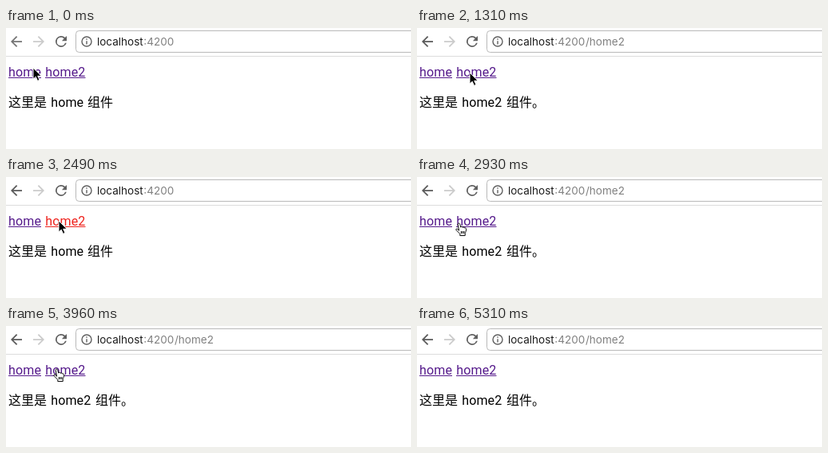
An HTML page that plays this animation: 507x152 px, repeating every 5890 ms.

```html
<!DOCTYPE html>
<html lang="zh">
<head>
<meta charset="utf-8">
<style>
html, body { margin: 0; width: 100%; height: 100%; overflow: hidden; background: #fff; }
svg { display: block; width: 507px; height: 152px; }
text { font: 16px Roboto, "Noto Sans CJK SC", "Noto Sans CJK", sans-serif; letter-spacing: .15px; }
.url text { font: 13.5px Inter, sans-serif; letter-spacing: 0; fill: #808080; }
.url .host { fill: #1c1c1c; }
.zh { letter-spacing: 0; }
</style>
</head>
<body>
<svg viewBox="0 0 507 152">
  <defs>
    <path id="arrow" d="M20 11H7.83l5.59-5.59L12 4l-8 8 8 8 1.41-1.41L7.83 13H20z"/>
  </defs>
  <path d="M0 35.5H507" stroke="#dcdcdc"/>
  <use id="back" href="#arrow" transform="translate(2.5 6.5) scale(.875)"/>
  <use href="#arrow" fill="#cbcbcb" transform="translate(51.5 6.5) scale(-.875 .875)"/>
  <path fill="#5f5f5f" transform="translate(58.5 6.5) scale(.875)"
    d="M17.65 6.35A8 8 0 1 0 19.73 14h-2.08A6 6 0 1 1 12 6c1.66 0 3.14.69 4.22 1.78L13 11h7V4z"/>
  <rect x="87.5" y="3.5" width="440" height="27" rx="4" fill="#fff" stroke="#b9b9b9"/>
  <g fill="none" stroke="#5f5f5f" stroke-width="1.4">
    <circle cx="101" cy="17" r="6"/>
    <path d="M101 13.3v1.5M101 16.2v4.3"/>
  </g>
  <g class="url">
    <text class="host" x="114" y="22">localhost</text>
    <text x="172.3" y="22">:4200</text>
    <text id="path" x="211" y="22">/home2</text>
  </g>
  <g id="link1"><text x="3" y="61">home</text><path d="M3 62.5H44" stroke="currentColor"/></g>
  <g id="link2"><text x="49.3" y="61">home2</text><path d="M49 62.5H99.5" stroke="currentColor"/></g>
  <text class="zh" x="3" y="99">这里是</text>
  <text id="name" x="56.2" y="99"></text>
  <text id="part" class="zh" y="99"></text>
  <path id="cursor" stroke-linejoin="round"/>
</svg>
<script>
const LOOP = 5890;
const ARROW = "M0 0V14.2L3.2 11.2 5.6 16.4 8 15.3 5.7 10.3H10.2Z";
const HAND = "M4.6 10.2L3.2 3C2.9.8 5.3.4 5.8 2.4L6.6 6C7.5 5 8.8 5.3 9.1 6.3 10 5.6 11.3 6 11.5 7 12.7 6.6 13.6 7.3 13.6 8.6 13.6 11 12.8 12.3 12.2 13.6V16.6H5.8V14.4C4.4 13 2.6 11.2 1 9.6.3 8.4 1.8 7.6 2.8 8.5Z" +
  "M7.4 11v3M9.2 11v3M11 11v3";
// start ms, cursor x, y, cursor shape, open page, pressed link
const steps = [
  [0, 34, 50, "a", 1], [140, 34, 51, "a", 1], [290, 35, 53, "a", 1],
  [440, 36, 55, "a", 1], [580, 38, 58, "a", 1], [730, 39, 60, "a", 1],
  [880, 46, 60, "a", 1], [1020, 58, 58, "a", 1], [1170, 67, 56, "a", 1],
  [1310, 66, 56, "a", 2], [1460, 60, 56, "h", 2],
  [1760, 35, 58, "h", 2], [1900, 34, 58, "h", 2], [2050, 34, 58, "h", 1],
  [2200, 42, 57, "a", 1], [2340, 58, 56, "a", 1], [2490, 66, 55, "a", 1, 2],
  [2630, 66, 55, "a", 2], [2780, 60, 56, "h", 2],
  [2930, 48, 57, "h", 2], [3080, 36, 57, "h", 2], [3220, 34, 57, "h", 2, 1],
  [3380, 33, 57, "h", 1], [3520, 46, 56, "h", 1], [3670, 59, 53, "h", 1],
  [3960, 59, 53, "h", 2],
  [4860, 60, 66, "a", 2], [5010, 61, 81, "a", 2], [5160, 60, 97, "a", 2],
  [5310, 0, 0, "", 2]
];
const $ = id => document.getElementById(id);
const set = (id, attrs) => {
  for (const key in attrs) $(id).setAttribute(key, attrs[key]);
};

function paintLink(id, pressed) {
  const color = pressed ? "#ee221c" : "#551a8b";
  set(id, { fill: color, color });
}

function draw(now) {
  const t = now % LOOP;
  const [, x, y, shape, page, pressed] = steps.findLast(s => s[0] <= t);
  const second = page === 2, hand = shape === "h";
  set("back", { fill: t < 1170 ? "#757575" : "#5a5a5a" });
  set("path", { visibility: second ? "visible" : "hidden" });
  paintLink("link1", pressed === 1);
  paintLink("link2", pressed === 2);
  $("name").textContent = second ? "home2" : "home";
  $("part").textContent = second ? "组件。" : "组件";
  set("part", { x: second ? 112 : 102 });
  set("cursor", {
    d: hand ? HAND : ARROW,
    transform: `translate(${x} ${y})`,
    fill: hand ? "#fff" : "#000",
    stroke: hand ? "#000" : "#fff",
    visibility: shape ? "visible" : "hidden"
  });
  requestAnimationFrame(draw);
}
requestAnimationFrame(draw);
</script>
</body>
</html>
```
